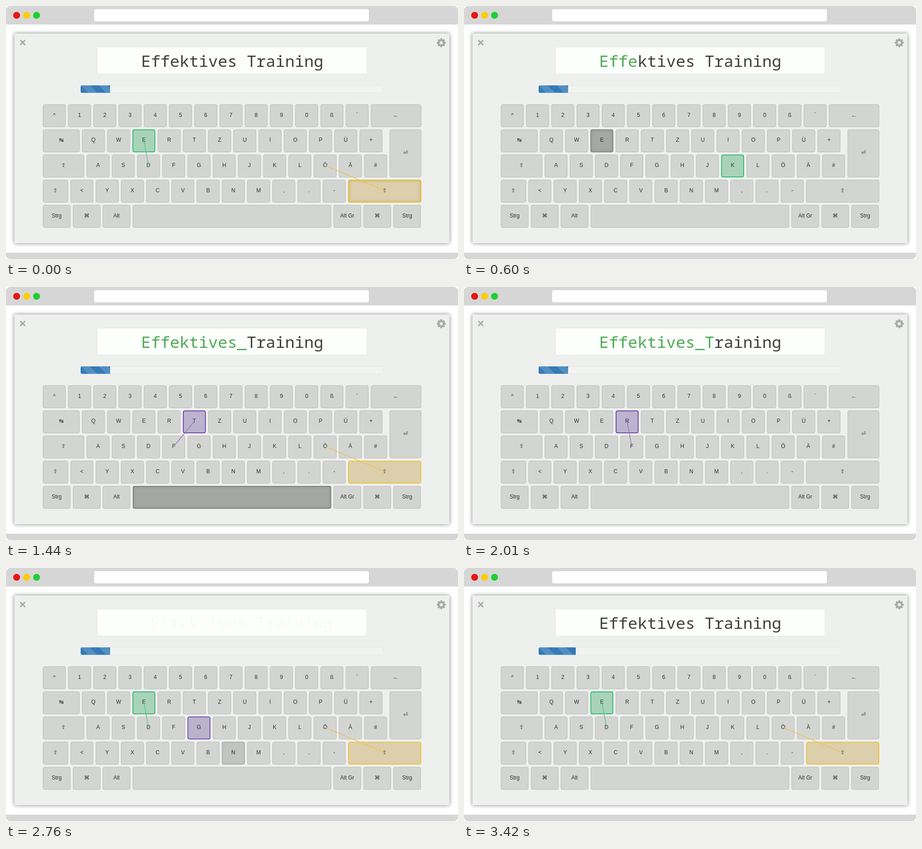
Write an HTML page with a canvas that moves like this. It is 999 px wide and 561 px high and loops after 3870 ms.

```html
<!DOCTYPE html>
<html lang="de">
<head>
<meta charset="utf-8">
<title>Tipptraining</title>
<style>
html, body { margin: 0; width: 100%; height: 100%; overflow: hidden; background: #fff; }
canvas { display: block; }
</style>
</head>
<body>
<canvas id="stage" width="999" height="561"></canvas>
<script>
const ctx = document.getElementById('stage').getContext('2d');
const LOOP = 3870, FADE = 90, DONE = 2758;
const TEXT = 'Effektives Training';
const TYPE_TIMES = [150, 290, 420, 530, 640, 740, 835, 932, 1040, 1140, 1270,
  1700, 2040, 2160, 2270, 2390, 2510, 2630, DONE];
const BASE = [211, 213, 210], DARK = [164, 167, 164];

// fill, border, guide line
const FINGERS = {
  little: [[220, 207, 171], '#f0c22c', '#efc04a'],
  ring: [[169, 196, 214], '#2b8fd6', '#62abd9'],
  middle: [[169, 211, 184], '#1fba63', '#5cc288'],
  index: [[188, 179, 206], '#5f37aa', '#9078c4'],
  thumb: [[218, 184, 176], '#d9604f', '#d98a80']
};
// key: [finger, home key]
const REACH = {
  E: ['middle', 'D'], I: ['middle', 'K'], K: ['middle'], F: ['index'], G: ['index'],
  T: ['index', 'F'], R: ['index', 'F'], V: ['index', 'F'], N: ['index', 'J'],
  S: ['ring'], A: ['little'], shift: ['little', 'Ö'], space: ['thumb']
};

const PITCH = 55.77, KEY = 50.4, ROW_Y = [218, 273.8, 329.6, 385.4, 441.1];
const keys = {};
function addKey(id, label, x, row, w = KEY, h = KEY) {
  keys[id] = { label, x, y: ROW_Y[row], w, h };
}
function addRun(labels, x, row) {
  [...labels].forEach((c, i) => addKey(c, c, x + i * PITCH, row));
}
addRun('^1234567890ß´', 81.6, 0);
addKey('back', '←', 806.6, 0, 111);
addKey('tab', '↹', 81.6, 1, 81);
addRun('QWERTZUIOPÜ+', 168, 1);
addKey('enter', '⏎', 847.8, 1, 70, 105.8);
addKey('caps', '⇪', 81.6, 2, 91.4);
addRun('ASDFGHJKLÖÄ#', 178.2, 2);
addKey('shiftL', '⇧', 81.6, 3, 55.6);
addRun('<YXCVBNM,.-', 142.6, 3);
addKey('shift', '⇧', 756.3, 3, 161.4);
[['Strg', 81.6], ['⌘', 148], ['Alt', 213.8], ['Alt Gr', 723.8], ['⌘', 790], ['Strg', 856.2]]
  .forEach(([label, x], i) => addKey('mod' + i, label, x, 4, 60.8));
addKey('space', '', 280.2, 4, 438.4);

const keyOf = c => c === ' ' ? 'space' : c.toUpperCase();
const presses = [...TEXT].map((c, i) => ({
  id: keyOf(c), down: TYPE_TIMES[i], up: TYPE_TIMES[i] + (c === ' ' ? 300 : 95)
}));
presses.push({ id: 'shift', down: 0, up: 240, snap: true },
  { id: 'shift', down: 1560, up: 1800, snap: true });

const clamp = v => Math.max(0, Math.min(1, v));
const easeOut = u => 1 - (1 - u) ** 2;
const mix = (a, b, u) => a.map((v, i) => v + (b[i] - v) * u);
const rgb = c => `rgb(${c.map(Math.round)})`;

// CSS "ease": cubic-bezier(.25, .1, .25, 1)
function cssEase(u) {
  let lo = 0, hi = 1, s = u;
  for (let i = 0; i < 20; i++) {
    s = (lo + hi) / 2;
    const x = .75 * s * (1 - s) + s ** 3;
    if (x < u) lo = s; else hi = s;
  }
  return .3 * s * (1 - s) ** 2 + 3 * s * s * (1 - s) + s ** 3;
}

function roundRect(x, y, w, h, r) {
  ctx.beginPath();
  ctx.roundRect(x, y, w, h, r);
}
function box(x, y, w, h, r, fill, border, line = 1) {
  roundRect(x, y, w, h, r);
  ctx.fillStyle = fill;
  ctx.fill();
  if (!border) return;
  roundRect(x + line / 2, y + line / 2, w - line, h - line, r);
  ctx.strokeStyle = border;
  ctx.lineWidth = line;
  ctx.stroke();
}
function disc(x, y, r, fill) {
  ctx.beginPath();
  ctx.arc(x, y, r, 0, 7);
  ctx.fillStyle = fill;
  ctx.fill();
}
function segment(x1, y1, x2, y2, color, width) {
  ctx.beginPath();
  ctx.moveTo(x1, y1);
  ctx.lineTo(x2, y2);
  ctx.strokeStyle = color;
  ctx.lineWidth = width;
  ctx.stroke();
}

function drawFrame() {
  ctx.fillStyle = '#fff';
  ctx.fillRect(0, 0, 999, 561);
  box(0, 0, 999, 41, [9, 9, 0, 0], '#d6d6d6');
  box(0, 547, 999, 14, [0, 0, 9, 9], '#d6d6d6');
  ['#e81515', '#ffcc00', '#1fcf32'].forEach((c, i) => disc(23.5 + 22 * i, 20.7, 7.6, c));
  box(195, 7, 607, 27, 4, '#fff');
  ctx.save();
  ctx.shadowColor = 'rgba(0,0,0,.5)';
  ctx.shadowBlur = 8;
  box(18.5, 61, 961.5, 465, 1, '#eef0ee');
  ctx.restore();
  segment(31.5, 75.5, 42.5, 86.5, '#a7a9a7', 3);
  segment(42.5, 75.5, 31.5, 86.5, '#a7a9a7', 3);
  drawGear(962, 81.5);
}

function drawGear(x, y) {
  for (let i = 0; i < 4; i++) {
    const a = i * Math.PI / 4, dx = 9.8 * Math.cos(a), dy = 9.8 * Math.sin(a);
    segment(x - dx, y - dy, x + dx, y + dy, '#a7a9a7', 4.4);
  }
  disc(x, y, 7.4, '#a7a9a7');
  disc(x, y, 3.4, '#eef0ee');
}

function drawText(t, typed) {
  box(201, 90.5, 597.5, 61, 3, '#fcfffc', '#dcdfdc');
  const u = t < DONE ? 1 : clamp((t - DONE + 10) / 500);
  const advance = 21.2, left = 298.7 + 22 * (1 - u) ** 2;
  ctx.font = '35.4px "Roboto Mono", "Noto Sans Mono", monospace';
  ctx.textAlign = 'center';
  ctx.globalAlpha = u;
  [...TEXT].forEach((c, i) => {
    const done = i < typed;
    ctx.fillStyle = done ? '#4caa52' : '#3c403d';
    ctx.fillText(done && c === ' ' ? '_' : c, left + (i + .5) * advance, 135);
  });
  ctx.globalAlpha = 1;
}

function drawProgress(t) {
  box(165, 176, 669, 17, 3, '#f1f3f1', '#e6e8e6');
  const w = 65.2 + 16.8 * cssEase(clamp((t - 2790) / 600));
  ctx.save();
  roundRect(165, 176, w, 16.5, [3, 0, 0, 3]);
  ctx.clip();
  ctx.fillStyle = '#337ab7';
  ctx.fillRect(165, 176, w, 17);
  ctx.fillStyle = 'rgba(255,255,255,.15)';
  for (let x = 165; x < 260; x += 40) {
    ctx.beginPath();
    ctx.moveTo(x, 176);
    ctx.lineTo(x + 20, 176);
    ctx.lineTo(x + 37, 193);
    ctx.lineTo(x + 17, 193);
    ctx.fill();
  }
  ctx.restore();
}

function pressState(id, t) {
  let amount = 0, held = false;
  for (const p of presses) {
    if (p.id !== id || t < p.down) continue;
    if (t < p.up) {
      held = true;
      amount = p.snap ? 1 : easeOut(clamp((t - p.down) / FADE));
    } else amount = Math.max(amount, 1 - easeOut(clamp((t - p.up) / FADE)));
  }
  return { amount, held };
}

function drawInset(k, strength) {
  ctx.save();
  roundRect(k.x, k.y, k.w, k.h, 4);
  ctx.clip();
  ctx.shadowColor = `rgba(0,0,0,${.5 * strength})`;
  ctx.shadowBlur = 7;
  roundRect(k.x - 2, k.y - 2, k.w + 4, k.h + 4, 5);
  ctx.strokeStyle = `rgba(130,132,130,${strength})`;
  ctx.lineWidth = 4;
  ctx.stroke();
  ctx.restore();
}

function drawKey(id, t, isTarget) {
  const k = keys[id], finger = REACH[id] && FINGERS[REACH[id][0]];
  const { amount, held } = pressState(id, t);
  let fill = BASE, border = '#bbbdba', line = 1;
  if (isTarget) {
    [fill, border] = finger;
    line = 1.7;
  } else if (amount || held) {
    fill = mix(held ? finger[0] : BASE, DARK, amount);
    border = held && amount < .3 ? finger[1] : rgb(mix([187, 189, 186], [140, 142, 140], amount));
    line = 1.5;
  }
  box(k.x, k.y, k.w, k.h, 3.5, rgb(fill), border, line);
  if (amount) {
    drawInset(k, amount * .75);
    if (isTarget) box(k.x, k.y, k.w, k.h, 3.5, 'transparent', border, 2);
  }
  ctx.fillStyle = '#2c2e2c';
  ctx.fillText(k.label, k.x + k.w / 2, k.y + k.h / 2 + 2.4);
}

function drawGuide(id) {
  const [finger, home] = REACH[id];
  if (!home) return;
  const a = keys[home], b = keys[id];
  segment(a.x + a.w / 2, a.y + 24, b.x + b.w / 2, b.y + 24, FINGERS[finger][2], 1.5);
}

function render(t) {
  const count = TYPE_TIMES.filter(v => v <= t).length;
  const typed = t < DONE ? count : 0;
  const next = TEXT[typed], targets = [keyOf(next)];
  if (next !== next.toLowerCase()) targets.push('shift');

  drawFrame();
  drawText(t, typed);
  drawProgress(t);
  ctx.font = '12px "Liberation Sans", Arial, "DejaVu Sans", sans-serif';
  ctx.textAlign = 'center';
  for (const id in keys) drawKey(id, t, targets.includes(id));
  targets.forEach(drawGuide);
}

const start = performance.now();
function tick() {
  render((performance.now() - start) % LOOP);
  requestAnimationFrame(tick);
}
tick();
</script>
</body>
</html>
```
